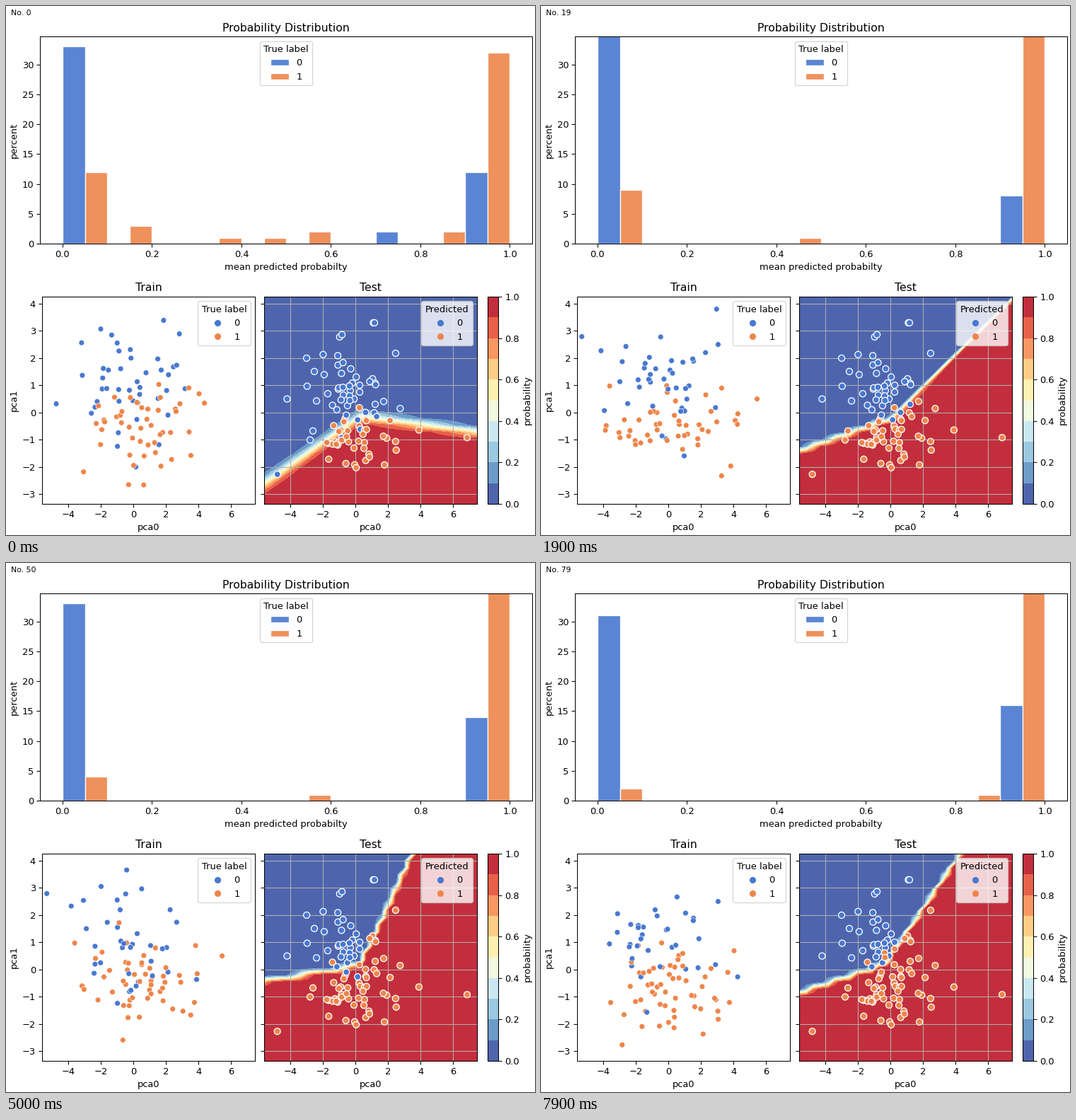
A matplotlib script for the animation above (8000 ms loop, 748 by 748 pixels).

```python
import numpy as np
import matplotlib.pyplot as plt
from matplotlib.animation import FuncAnimation
from matplotlib.cm import ScalarMappable
from matplotlib.colors import BoundaryNorm, ListedColormap, to_rgba
from matplotlib.lines import Line2D
from matplotlib.patches import Patch

SIZE, FRAMES, INTERVAL = 748, 80, 100
BLUE, ORANGE = "#4878d0", "#ee854a"
COLORS = np.array([BLUE, ORANGE])
FILLS = [to_rgba(c, 0.9) for c in COLORS]
XLIM, YLIM = (-5.61, 7.47), (-3.356, 4.26)
LEVELS = np.linspace(0, 1, 11)
SHADES = 0.1 + 0.9 * plt.get_cmap("RdYlBu_r")(LEVELS[:-1] + 0.05)[:, :3]

plt.rcParams["font.family"] = "DejaVu Sans"

# Decision boundary as a bent line: frame, knee x, knee y, left and right slope
BOUNDARY = np.array([
    (0, 0.3, -0.15, 0.42, -0.08),
    (10, 0.0, 0.05, 0.28, 0.2),
    (19, 0.2, -0.2, 0.21, 0.6),
    (31, 0.3, 0.15, 0.14, 1.02),
    (42, 0.3, 0.15, 0.1, 1.26),
    (58, 0.2, 0.15, 0.1, 1.23),
    (79, -0.3, 0.2, 0.2, 0.88),
])
OUTLIERS = [(6.86, -0.92), (3.9, -0.64), (-4.8, -2.27), (1.1, 3.3), (1.17, 3.3),
            (2.47, 2.18), (-3, 2), (-0.97, 2.78), (-4.2, 0.5), (2.75, 0.15)]


def box(left, top, right, bottom):
    return fig.add_axes([left / SIZE, 1 - bottom / SIZE,
                         (right - left) / SIZE, (bottom - top) / SIZE])


def dot_legend(ax, title):
    ax.legend(title=title, loc="upper right", handles=[
        Line2D([], [], ls="", marker="o", ms=6, color=c, label=n)
        for n, c in enumerate(COLORS)])


def edge_and_slope(frame, x):
    knee_x, knee_y, left, right = (
        np.interp(frame, BOUNDARY[:, 0], column) for column in BOUNDARY.T[1:])
    slope = np.where(x < knee_x, left, right)
    return knee_y + slope * (x - knee_x), slope


def probability(frame, x, y):
    edge, slope = edge_and_slope(frame, x)
    sharpness = (8 + 28 * (1 - np.exp(-frame / 20))) * (1 + 0.04 * x)
    z = sharpness * (edge - y) / np.hypot(1, slope)
    return 1 / (1 + np.exp(-np.clip(z, -6, 6)))


def bar_heights(frame, rng):
    unsure = np.exp(-frame / 3)
    blue, orange = (np.bincount(rng.integers(1, 9, round(n)), minlength=10)
                    for n in (2 * unsure, 1 + 8 * unsure))
    dip = 4 * np.exp(-((frame - 19) / 6) ** 2)
    blue[9] = round(12 + 4 * (frame / 79) ** 2 - dip)
    blue[0] = 47 - blue.sum()
    orange[0] = max(2, round(12 * (1 - frame / FRAMES) ** 1.2))
    orange[9] = 53 - orange.sum()
    return blue, orange


fig = plt.figure(figsize=(8, 8), dpi=SIZE / 8, facecolor="white")
counter = fig.text(0.01, 1 - 13 / SIZE, "", fontsize="small")

hist = box(48.3, 43.3, 744.1, 336)
hist.set(xlim=(-0.05, 1.05), ylim=(0, 34.65), title="Probability Distribution",
         xlabel="mean predicted probabilty", ylabel="percent")
bars = [hist.bar(np.arange(10) / 10 + shift, np.zeros(10), 0.05, align="edge",
                 color=fill, edgecolor="white", linewidth=1)
        for shift, fill in zip((0, 0.05), FILLS)]
hist.legend(title="True label", loc="upper center", handles=[
    Patch(facecolor=f, edgecolor="white", label=n) for n, f in enumerate(FILLS)])

train = box(51, 411, 352, 704)
test = box(365, 411, 666, 704)
for ax, title in ((train, "Train"), (test, "Test")):
    ax.set(xlim=XLIM, ylim=YLIM, title=title, xlabel="pca0",
           xticks=range(-4, 7, 2), yticks=range(-3, 5))
train.set_ylabel("pca1")
test.tick_params(labelleft=False)
test.grid(True)
dot_legend(train, "True label")
dot_legend(test, "Predicted")

bar = fig.colorbar(
    ScalarMappable(BoundaryNorm(LEVELS, 10), ListedColormap(SHADES)),
    cax=box(681, 411, 696, 704), ticks=LEVELS[::2], label="probability")
bar.ax.set_yticklabels([f"{v:.1f}" for v in LEVELS[::2]])
bar.minorticks_off()

# Samples: a training pool redrawn every frame and a fixed test set
pool_rng = np.random.default_rng(4)
BLUE_POOL = pool_rng.normal((-0.5, 0.95), (1.9, 1.2), (400, 2))
ORANGE_POOL = pool_rng.normal((0.2, -0.6), (2.0, 0.9), (500, 2))
TEST = np.vstack([OUTLIERS,
                  pool_rng.normal((-0.5, 1.0), (1.3, 0.7), (36, 2)),
                  pool_rng.normal((-0.2, -0.7), (1.4, 0.6), (48, 2))])
# Features outside the plotted plane shift some predictions
HIDDEN = np.where(np.arange(len(TEST)) < len(OUTLIERS), 0,
                  pool_rng.normal(0, 0.35, len(TEST)))

train_dots = train.scatter([], [], s=36, edgecolor="white", linewidth=0.48)
test_dots = test.scatter(*TEST.T, s=48, edgecolor="white", linewidth=1, zorder=2)

GRID = np.meshgrid(np.linspace(*XLIM, 30), np.linspace(*YLIM, 30))
surface = []


def draw(frame):
    rng = np.random.default_rng(100 + frame)
    counter.set_text(f"No. {frame}")
    for group, heights in zip(bars, bar_heights(frame, rng)):
        for rect, height in zip(group, heights):
            rect.set_height(height)

    n_blue = round(44 - 10 * frame / FRAMES)
    points = np.vstack([rng.choice(BLUE_POOL, n_blue, replace=False),
                        rng.choice(ORANGE_POOL, 90 - n_blue, replace=False)])
    order = rng.permutation(90)
    train_dots.set_offsets(points[order])
    train_dots.set_facecolor(COLORS[(order >= n_blue).astype(int)])

    while surface:
        surface.pop().remove()
    surface.append(test.contourf(*GRID, probability(frame, *GRID),
                                 levels=LEVELS, colors=SHADES, zorder=0))
    predicted = probability(frame, TEST[:, 0], TEST[:, 1] + HIDDEN) > 0.5
    test_dots.set_facecolor(COLORS[predicted.astype(int)])


animation = FuncAnimation(fig, draw, frames=FRAMES, interval=INTERVAL,
                          init_func=lambda: None, repeat=True, repeat_delay=0)
plt.show()
```
